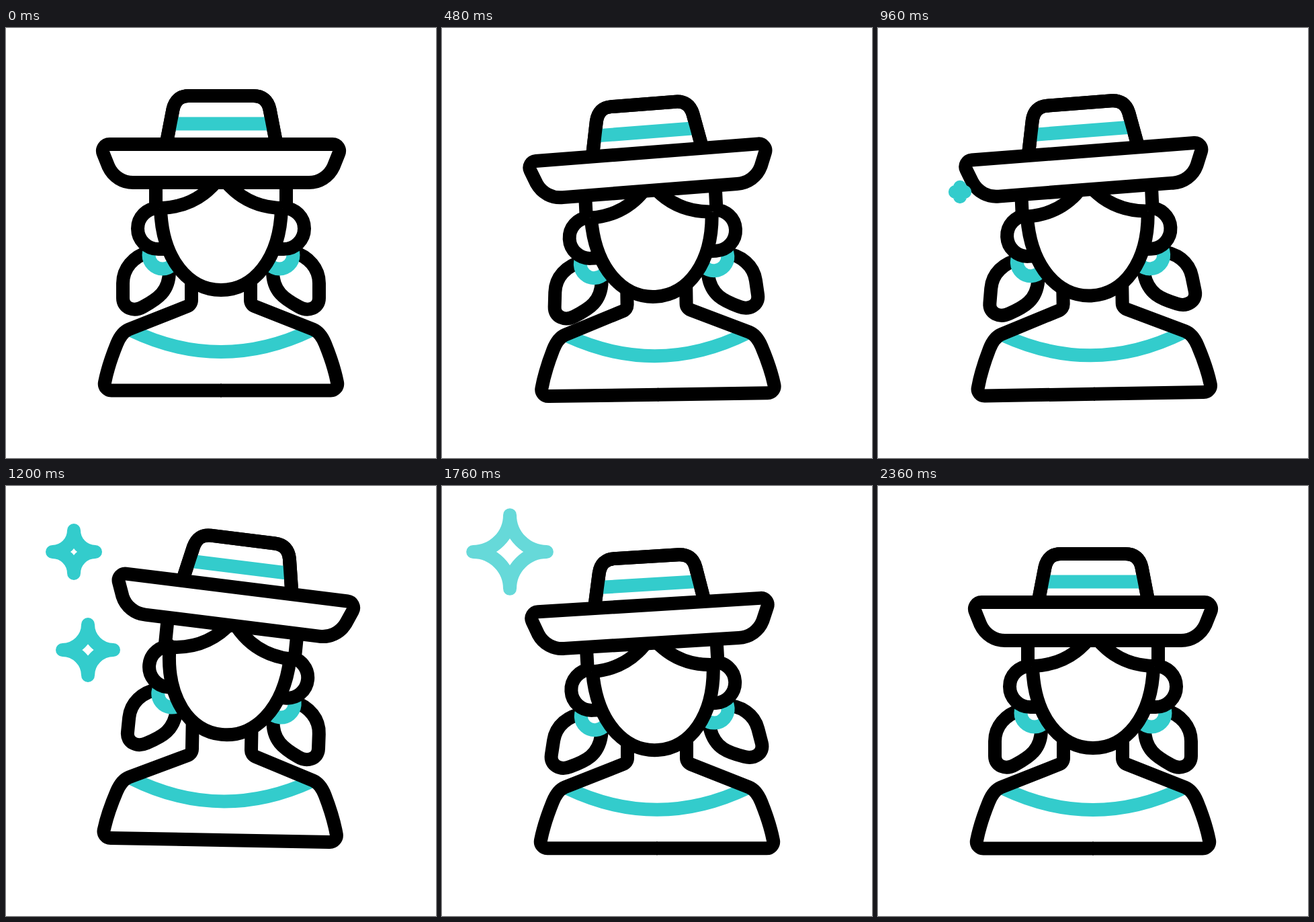
An HTML page that plays this animation: 640x640 px, repeating every 2.6 s.

```html
<!DOCTYPE html>
<html lang="en">
<head>
<meta charset="utf-8">
<title>Woman in a hat</title>
<style>
  html, body { margin: 0; width: 100%; height: 100%; overflow: hidden; background: #fff; }
  svg { display: block; width: 100vw; height: 100vh; }
  .line { fill: none; stroke: #000; stroke-width: 20; stroke-linejoin: round; }
  .solid { fill: #fff; }
  .teal { stroke: #3cc; }
</style>
</head>
<body>
<svg viewBox="0 0 640 640">
  <defs>
    <path id="shoulder" d="M276 350V405A10 10 0 0 1 269.7 414.3L183 448.5Q172 453 165 470Q152 502 147 527.5A10 10 0 0 0 157 539.5H321"/>
    <path id="hair" d="M223 225V268M320 220Q286 267 229 268"/>
    <path id="tail" d="M214 333C189 340 174 358 174 380V402C174 417 190 423 204 415C226 403 243 392 243 362V346"/>
    <path id="ear" d="M228 268H226.5A30.5 30.5 0 0 0 226.5 329H238"/>
    <path id="crown" d="M239 170L248.5 121Q253 101 272 101H368Q388 101 392.5 121L402 170"/>
  </defs>

  <g id="body" class="line">
    <path class="teal" d="M186 450Q320 514 454 450"/>
    <use href="#shoulder"/>
    <use href="#shoulder" transform="matrix(-1 0 0 1 640 0)"/>
  </g>

  <g id="head" class="line">
    <g class="side">
      <use class="tail" href="#tail"/>
      <circle class="ring teal solid" cx="233" cy="338" r="20.5"/>
      <use class="solid" href="#ear"/>
    </g>
    <g transform="matrix(-1 0 0 1 640 0)">
      <g class="side">
        <use class="tail" href="#tail"/>
        <circle class="ring teal solid" cx="233" cy="338" r="20.5"/>
        <use class="solid" href="#ear"/>
      </g>
    </g>
    <path class="solid" d="M230 268C232 345 272 390 320 390S408 345 410 268"/>
    <use href="#hair"/>
    <use href="#hair" transform="matrix(-1 0 0 1 640 0)"/>
    <g id="hat">
      <use class="solid" href="#crown"/>
      <path class="teal" d="M251 142.5H389"/>
      <use href="#crown"/>
      <path class="solid" d="M154 173H486A10 10 0 0 1 495.3 186.7L487.3 206.7A40 40 0 0 1 450 230H190A40 40 0 0 1 152.7 206.7L144.7 186.7A10 10 0 0 1 154 173Z"/>
    </g>
  </g>

  <path id="bigStar" class="line teal"/>
  <path id="smallStar" class="line teal"/>
</svg>

<script>
const LOOP = 2600, STEP = 40;
const SWAY = [220, 770, 1320, 1520, 1820, 2350];
const $ = id => document.getElementById(id);

// Smooth curve through the given points, flat at every peak and at both ends
function track(times, values) {
  const last = times.length - 1;
  const rise = i => (values[i + 1] - values[i]) / (times[i + 1] - times[i]);
  const slope = times.map((_, i) => {
    if (i === 0 || i === last) return 0;
    const a = rise(i - 1), b = rise(i);
    return a * b <= 0 ? 0 : 2 * a * b / (a + b);
  });
  return t => {
    if (t <= times[0]) return values[0];
    if (t >= times[last]) return values[last];
    const i = times.findIndex(end => t < end) - 1;
    const span = times[i + 1] - times[i], u = (t - times[i]) / span, v = 1 - u;
    return values[i] * v * v * (1 + 2 * u) + values[i + 1] * u * u * (3 - 2 * u)
      + span * u * v * (slope[i] * v - slope[i + 1] * u);
  };
}

// Poses: left lean, right lean, on the way back, small left lean
const sway = (...poses) => track(SWAY, [0, ...poses, 0]);
const still = () => 0;

function part(el, x, y, turn = still, pivot = [0, 0]) {
  return t => el.setAttribute('transform',
    `translate(${x(t)} ${y(t)}) rotate(${turn(t)} ${pivot})`);
}

function side(el, x, y, ring, tail) {
  return [
    part(el, x, y),
    part(el.querySelector('.ring'), ring, still),
    part(el.querySelector('.tail'), still, still, tail, [215, 335])
  ];
}

const ramp = (t, from, to) => Math.min(1, Math.max(0, (t - from) / (to - from)));

function star(el, cx, cy, radius, fadeIn, fadeOut) {
  return t => {
    const r = radius(t), arc = (x, y) => `A${r} ${r} 0 0 0 ${cx + x} ${cy + y}`;
    el.setAttribute('d', r < 0.5 ? '' :
      `M${cx} ${cy - r}${arc(r, 0)}${arc(0, r)}${arc(-r, 0)}${arc(0, -r)}Z`);
    el.setAttribute('opacity', ramp(t, ...fadeIn) * (1 - ramp(t, ...fadeOut)));
  };
}

const [left, right] = document.querySelectorAll('.side');
const parts = [
  part($('body'), sway(3.5, -2.2, -0.5, 0), sway(13.4, -16.2, -4, 0),
    sway(-1.88, 1.46, 0.35, 0), [320, 540]),
  part($('head'), sway(-4.3, 1.7, -1.8, 1.2), sway(21.5, -25.9, -10, 3.9),
    sway(-6.45, 7.4, 4.4, -4), [320, 390]),
  part($('hat'), sway(-3.3, 1, 0, 0), sway(4.3, -4, -3, 1),
    sway(-3.2, 2, 1.1, -0.3), [320, 183]),
  ...side(left, sway(1, 7.3, 7.5, 0), sway(-2, -0.7, 4, -4.5),
    sway(-5, 2.7, 6, -5.5), sway(10, -3.4, -8.5, 14.4)),
  ...side(right, sway(0, 5.6, 6, 2.4), sway(-5.4, -2, -3, -4),
    sway(-6, -0.2, -0.8, -4), sway(11.5, 2.5, 2.5, 12.3)),
  star($('bigStar'), 101, 98,
    track([960, 1200, 1320, 1520, 1800], [0, 32, 45, 51, 55]), [960, 1060], [1720, 1880]),
  star($('smallStar'), 122, 244,
    track([860, 1200, 1340, 1520, 1700], [0, 38, 41, 31, 0]), [860, 960], [1560, 1700])
];

function draw(t) {
  parts.forEach(update => update(t));
}

const start = performance.now();
function tick() {
  const t = (performance.now() - start) % LOOP;
  draw(Math.floor(t / STEP) * STEP);
  requestAnimationFrame(tick);
}
tick();
</script>
</body>
</html>
```
